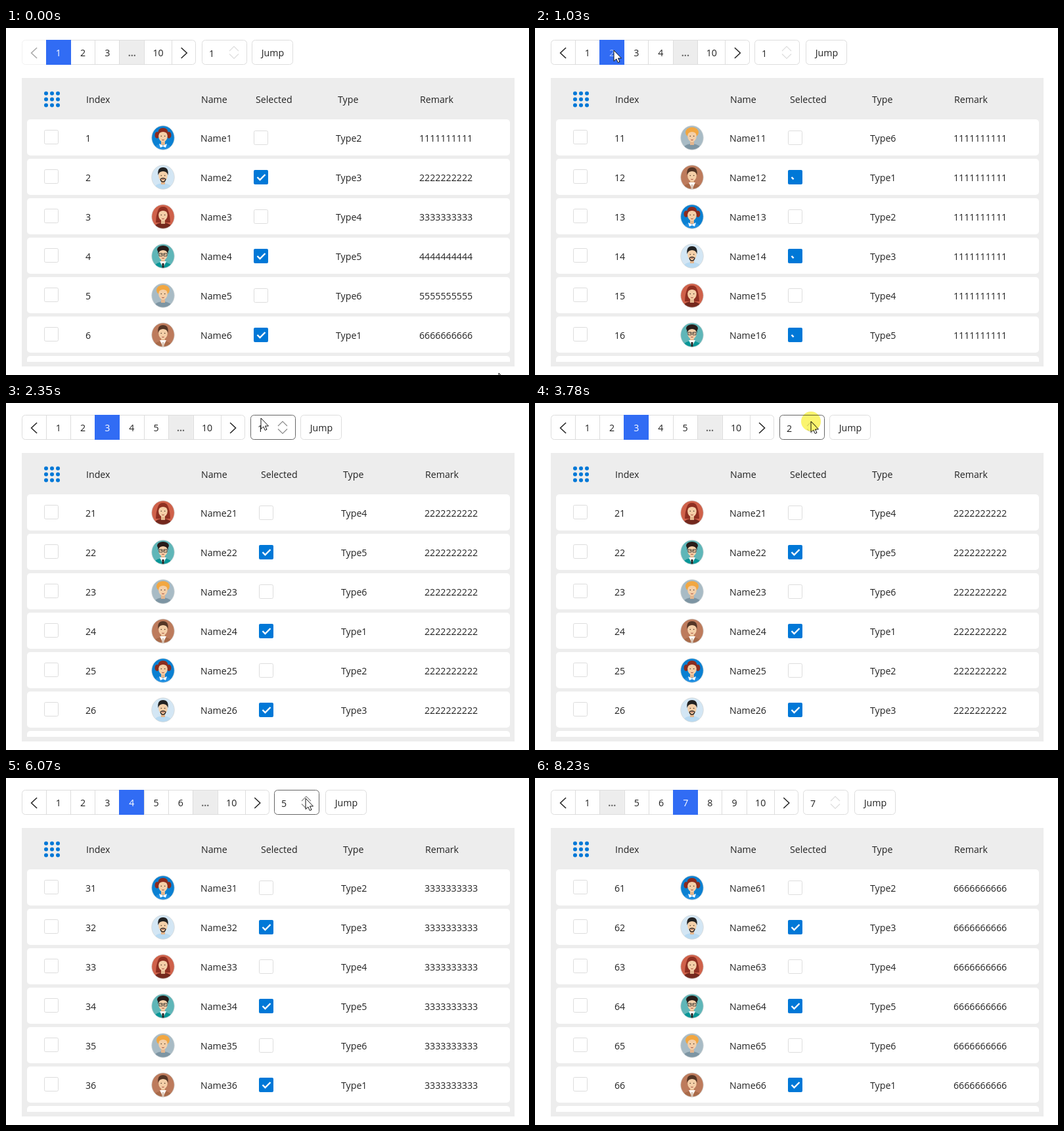
An HTML page for the animation above (8.43 s loop, 796 px wide and 528 px high).

```html
<!DOCTYPE html>
<html lang="en">
<head>
<meta charset="utf-8">
<title>Paged table</title>
<style>
html, body { margin: 0; width: 100%; height: 100%; overflow: hidden; background: #fff }
svg { display: block; font: 14.2px "Open Sans", "Noto Sans", sans-serif; fill: #222 }
#glow { mix-blend-mode: multiply }
</style>
</head>
<body>
<svg width="796" height="528" viewBox="0 0 796 528">
  <defs id="defs">
    <clipPath id="list"><rect x="24" y="130" width="750" height="378"/></clipPath>
    <clipPath id="oval"><ellipse rx="17.3" ry="18.3"/></clipPath>
  </defs>
  <g id="scene"></g>
  <path id="cursor" d="M0 0V16.5L3.8 13 6.3 18.5 9 17.3 6.5 12H11.5Z" fill="#fff" stroke="#111"/>
  <circle id="glow" r="15" fill="#faf46e"/>
</svg>
<script>
const LOOP = 8430, BLUE = '#0078d7', ACTIVE = '#316cf4', LINE = '#ddd', GREY = '#ededed';
const $ = id => document.getElementById(id);

const clicks = [
  { at: 890, page: 2 }, { at: 1800, page: 3 },
  { at: 3250, up: 1 }, { at: 3780, up: 1 }, { at: 4120, up: 1 }, { at: 5000, jump: 1 },
  { at: 5940, up: 1 }, { at: 6080, up: 1 }, { at: 6220, up: 1 }, { at: 7140, jump: 1 }];

// Pointer moves: begin, end, x, y
const moves = [
  [0, 690, 120, 34], [1660, 1800, 155, 31], [2050, 2630, 417, 22], [2960, 3100, 420, 28],
  [4520, 4800, 467, 35], [5600, 5670, 456, 31], [6300, 6680, 523, 36], [7680, 8230, 754, 535]];

function pointer(t) {
  let x = 753, y = 527;
  for (const [begin, end, tx, ty] of moves) {
    const u = Math.min(1, Math.max(0, (t - begin) / (end - begin)));
    const f = 1 - (1 - u) ** 3;
    x += (tx - x) * f;
    y += (ty - y) * f;
  }
  return { x: Math.round(x), y: Math.round(y) };
}

function stateAt(t) {
  const s = { page: 1, value: 1, drawn: 1, glow: false, pressed: false, ...pointer(t) };
  for (const { at, page, up, jump } of clicks) {
    const age = t - at;
    if (age < 0) break;
    s.glow = age < 60;
    s.pressed = !!jump && age < 100;
    if (up && age >= 50) s.value++;
    if (!up && age >= 100) {
      s.page = page || s.value;
      s.drawn = Math.min(1, (age - 90) / 200);
    }
  }
  return s;
}

const rect = (x, y, w, h, fill, r = 0, more = '') =>
  `<rect x="${x}" y="${y}" width="${w}" height="${h}" rx="${r}" fill="${fill}" ${more}/>`;
const frame = (x, y, w, h, r, color = LINE, fill = '#fff') =>
  rect(x + .5, y + .5, w - 1, h - 1, fill, r, `stroke="${color}"`);
const text = (x, y, s, more = '') => `<text x="${x}" y="${y}" ${more}>${s}</text>`;
const line = (d, color, w = 1, more = '') =>
  `<path d="${d}" fill="none" stroke="${color}" stroke-width="${w}" ${more}/>`;
const shape = (d, fill) => `<path d="${d}" fill="${fill}"/>`;
const oval = (x, y, rx, ry, fill) =>
  `<ellipse cx="${x}" cy="${y}" rx="${rx}" ry="${ry}" fill="${fill}"/>`;

const pair = draw => draw(-1) + draw(1);
const collar = (fill, tie) => shape('M-5 8L0 18 5 8Z', fill) + rect(-1.5, 11, 3, 8, tie);
const people = [
  { bg: '#bd7b5c', hair: '#553626', coat: '#a96a49', front: collar('#fff', '#d8c4b4') },
  { bg: '#0a80d2', hair: '#8c2c1f', coat: '#1c8ee2',
    back: pair(s => oval(s * 9, -4, 3.5, 5, '#8c2c1f')), front: shape('M-6 9L0 12 6 9 4 15 0 13-4 15Z', '#fff') },
  { bg: '#d3e6f4', hair: '#222', coat: '#b8daf2',
    front: line('M-4 3Q0 0 4 3Q3 7 0 7Q-3 7-4 3', '#332a25', 1.4) },
  { bg: '#cf614a', hair: '#8f3022', coat: '#74281d', back: shape('M-11 9Q-10-15 0-15Q10-15 11 9Z', '#8f3022') },
  { bg: '#5fb6b8', hair: '#281d1a', coat: '#079697', back: oval(0, -10, 9, 6, '#281d1a'),
    front: collar('#fff', '#222') + pair(s => line(`M${s} -4h${s * 5}v4h${-s * 5}z`, '#333', .9)) },
  { bg: '#a8bbc5', hair: '#f2a741', coat: '#7d95a3', back: oval(0, -8, 10, 8, '#f2a741') }];

function portrait({ bg, hair, coat, back = '', front = '' }, i) {
  return `<g id="p${i + 1}"><g clip-path="url(#oval)">` + oval(0, 0, 18, 19, bg) + back +
    shape('M-15 20Q-14 10 0 9Q14 10 15 20Z', coat) + rect(-3, 3, 6, 8, '#e3b68e') +
    oval(0, -2.5, 6.8, 9, '#f4cfa8') + shape('M-7.5-3Q-9-15 0-15Q9-15 7.5-3Q6-9 0-9Q-6-9-7.5-3Z', hair) +
    pair(s => oval(s * 2.7, -2.5, .8, .8, '#432')) + line('M-1.8 3Q0 4 1.8 3', '#a54a3a') + front +
    `</g><ellipse rx="17.3" ry="18.3" fill="none" stroke="#d5d8d8" stroke-width=".8"/></g>`;
}
$('defs').innerHTML += people.map(portrait).join('');

function pageItems(page) {
  const items = ['<'];
  for (let n = 1, last = 0; n <= 10; n++) {
    if (n > 1 && n < 10 && Math.abs(n - page) > 2) continue;
    if (n - last > 1) items.push('...');
    items.push(last = n);
  }
  return [...items, '>'];
}

function pager({ page, value, x: mx, y: my, glow, pressed }) {
  const over = (x, w) => mx >= x && mx < x + w && my >= 18 && my < 56;
  let x = 24, cells = '', dividers = '', selected = '';
  for (const item of pageItems(page)) {
    const w = item === '...' ? 37.8 : item === 10 ? 42 : 37.2;
    const left = Math.floor(x), mid = x + w / 2, dots = item === '...';
    const hover = over(left, w), side = item === '<' ? -1 : 1;
    const label = item === '<' || item === '>'
      ? line(`M${mid - side * 4.5} 30l${side * 8.5} 8l${-side * 8.5} 8`, '#222', 1.5)
      : text(mid, 43, item, `text-anchor="middle" opacity="${hover ? .6 : 1}"` +
          (item === page ? ' fill="#fff"' : dots ? ' fill="#666" font-weight="700"' : ''));
    if (item === page) selected = rect(left, 18, 38, 38, ACTIVE) + label;
    else cells += (dots || hover ? rect(left, 18, w, 38, GREY) : '') + label;
    if (x > 24) dividers += `M${left + .5} 19V55`;
    x += w;
  }
  let s = cells + line(dividers, LINE) + frame(24, 18, Math.floor(x) - 24, 38, 5, LINE, 'none');
  if (page === 1) s += rect(23, 17, 38, 40, '#fff', 0, 'opacity=".6"');
  s += selected;

  // The controls after the pages sit on even pixels
  const even = v => 2 * Math.round(v / 2);
  const box = even(x + 7.4), jump = even(x + 84.4), c = box + 49;
  const focus = over(box, 69), chevrons = focus && !glow ? '#888' : LINE;
  s += frame(box, 18, 69, 38, 5, focus ? '#666' : LINE) + text(box + 11, 44, value) +
    line(`M${c - 7} 35l7-7 7 7m-14 4.5l7 7 7-7`, chevrons, 1.1);
  return s + frame(jump, 18, 63, 38, 5, pressed ? GREY : LINE, pressed ? GREY : '#fff') +
    text(jump + 32, 43, 'Jump', `text-anchor="middle" fill="${over(jump, 63) ? '#888' : '#222'}"`);
}

function table({ page, drawn }) {
  const shift = page > 1 ? 8 : 0, tick = 377 + shift, type = 502 + shift, remark = 629 + shift;
  let s = rect(24, 76, 750, 439, GREY);
  for (let i = 0; i < 9; i++) s += oval(61 + i % 3 * 9, 99.5 + Math.floor(i / 3) * 9, 3, 3, BLUE);
  s += text(122, 114, 'Index') + text(297, 114, 'Name') + text(tick + 3, 114, 'Selected') +
    text(type + 3, 114, 'Type') + text(remark + 1, 114, 'Remark') + '<g clip-path="url(#list)">';
  for (let i = 0; i < 7; i++) {
    const n = page * 10 - 9 + i, y = 139 + 60 * i, base = y + 34, kind = n % 6 + 1;
    s += rect(32, y, 735, 55, '#fff', 5) + frame(58, y + 16, 22, 22, 2) +
      text(121, base, n) + `<use href="#p${kind}" x="239" y="${y + 28}"/>` +
      text(296, base, 'Name' + n) + text(type, base, 'Type' + kind) +
      text(remark, base, String(n)[0].repeat(10));
    s += n % 2 ? frame(tick, y + 17, 22, 22, 2)
      : rect(tick, y + 17, 22, 22, BLUE, 2) +
        line(`M${tick + 5.5} ${y + 28}l4 4 8-8`, '#fff', 2.4, `pathLength="1" stroke-dasharray="${drawn} 2"`);
  }
  return s + '</g>';
}

let shown = '';
function draw(t) {
  const s = stateAt(t), scene = table(s) + pager(s);
  if (scene !== shown) $('scene').innerHTML = shown = scene;
  for (const id of ['cursor', 'glow']) $(id).setAttribute('transform', `translate(${s.x} ${s.y})`);
  $('glow').setAttribute('visibility', s.glow ? 'visible' : 'hidden');
}

const start = performance.now();
function tick() {
  draw((performance.now() - start) % LOOP);
  requestAnimationFrame(tick);
}
tick();
</script>
</body>
</html>
```
